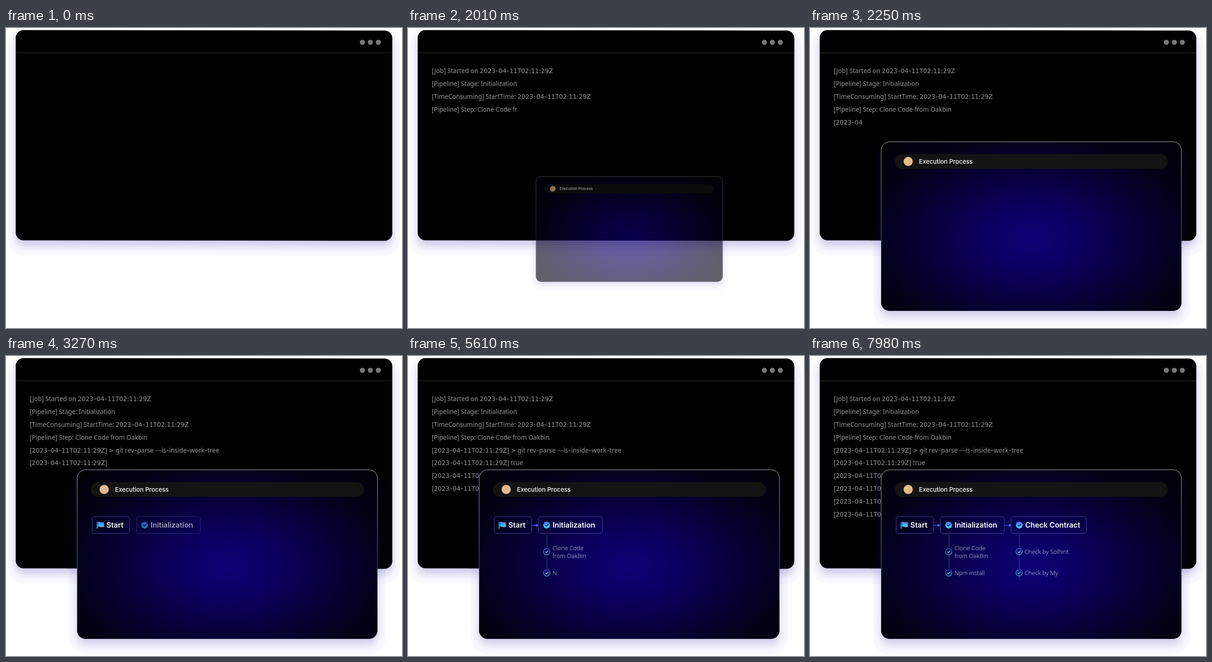
Recreate the animation shown at these times as an HTML page. Size 859 by 652 pixels, loop 8000 ms.

```html
<!DOCTYPE html>
<html lang="en">
<head>
<meta charset="utf-8">
<title>Pipeline run</title>
<style>
  html, body { margin: 0; width: 100%; height: 100%; overflow: hidden; background: #fff; }
  svg { display: block; width: 859px; height: 652px; }
  text { white-space: pre; }
  .log { font: 13.6px "Noto Sans", sans-serif; fill: #979797; }
  .log .wide { font: 13.4px "DejaVu Sans", sans-serif; }
  .title { font: 500 13.2px Inter, sans-serif; fill: #fff; }
  .stage { font: 600 15.8px Inter, sans-serif; fill: #fff; }
  .step { font: 300 13px "Open Sans", sans-serif; fill: #d9d9ee; }
  .box { fill: none; stroke: #454b9c; }
  .dots { stroke: #4a9ae0; stroke-dasharray: 1.5 1.5; }
  .link { stroke: #3f57dc; stroke-width: 1.3; }
  .tick { fill: none; stroke-linecap: round; stroke-linejoin: round; }
</style>
</head>
<body>
<svg id="scene" viewBox="0 0 859 652">
  <defs>
    <filter id="blur" x="-20%" y="-20%" width="140%" height="140%">
      <feGaussianBlur stdDeviation="8"/>
    </filter>
    <radialGradient id="night" gradientUnits="userSpaceOnUse" cx="0" cy="0" r="1"
      gradientTransform="translate(480 457) scale(461 297)">
      <stop offset="0" stop-color="#0c0076"/>
      <stop offset=".25" stop-color="#0a005e"/>
      <stop offset=".5" stop-color="#070038"/>
      <stop offset=".75" stop-color="#030016"/>
      <stop offset="1" stop-color="#000004"/>
    </radialGradient>
    <linearGradient id="rim" x1="0" y1="0" x2="0" y2="1">
      <stop offset="0" stop-color="#fff" stop-opacity=".7"/>
      <stop offset="1" stop-color="#fff" stop-opacity=".15"/>
    </linearGradient>
    <linearGradient id="aqua" x1="0" y1="0" x2="0" y2="1">
      <stop offset="0" stop-color="#4d74ff"/>
      <stop offset="1" stop-color="#35dcea"/>
    </linearGradient>
  </defs>

  <g transform="translate(0 -.03) skewY(.07)">
    <rect x="4" y="4" width="851" height="491" rx="35" fill="#00f" fill-opacity=".028"/>
    <rect x="21" y="17" width="817" height="457" rx="17" fill="#181a82" fill-opacity=".17" filter="url(#blur)"/>
    <rect x="21" y="4.5" width="817" height="457" rx="17"/>
  </g>
  <path d="M21 54H838" stroke="#333"/>
  <g fill="#777">
    <circle cx="773" cy="31" r="5.5"/>
    <circle cx="790.3" cy="31" r="5.5"/>
    <circle cx="807.6" cy="31" r="5.5"/>
  </g>
  <g id="log" class="log"></g>

  <g id="panel">
    <rect x="137" y="246" width="687" height="402" rx="36" fill="#00f" fill-opacity=".028"/>
    <rect x="154" y="259" width="652" height="368" rx="19" fill="#181a82" fill-opacity=".17" filter="url(#blur)"/>
    <rect x="154" y="247" width="652" height="368" rx="19" fill="#000"/>
    <rect x="154" y="247" width="652" height="368" rx="19" fill="url(#night)"/>
    <rect x="154.3" y="247.3" width="651.4" height="367.4" rx="18.5" fill="none" stroke="url(#rim)"/>
    <rect x="184" y="274" width="592" height="32" rx="16" fill="#131313"/>
    <circle cx="213" cy="290" r="10" fill="#e3b98c"/>
    <text class="title" x="236.5" y="294.5">Execution Process</text>
    <g id="flow"></g>
  </g>
</svg>
<script>
const LOOP = 8000, TICK = 30, LOG_MS = 13.76, STEP_MS = 16;
const $ = id => document.getElementById(id);
const clamp = v => Math.max(0, Math.min(1, v));
const span = (t, from, to) => clamp((t - from) / (to - from));
const easeOut = p => 1 - (1 - p) * (1 - p);
const updates = [];

function add(parent, tag, attrs = {}, text = "") {
  const el = document.createElementNS("http://www.w3.org/2000/svg", tag);
  for (const key in attrs) el.setAttribute(key, attrs[key]);
  el.textContent = text;
  parent.append(el);
  return el;
}

// Terminal log
const STAMP = "2023–04–11T02:11:29Z";
const lines = [
  `[Job] Started on ${STAMP}`,
  "[Pipeline] Stage: Initialization",
  `[TimeConsuming] StartTime: ${STAMP}`,
  "[Pipeline] Step: Clone Code from Oakbin",
  `[${STAMP}] > git rev–parse ––is–inside–work–tree`,
  `[${STAMP}] true`,
  `[${STAMP}]`, `[${STAMP}]`, `[${STAMP}]`, `[${STAMP}]`
];
const lateStarts = { 7: 4815, 8: 5850, 9: 7200 };

let typed = 0;
lines.forEach((line, i) => {
  const start = lateStarts[i] ?? typed * LOG_MS;
  typed += line.length;
  const row = add($("log"), "text", { x: 51.5, y: 97.7 + i * 27.95 });
  const parts = line.split(/(\d[\d–:TZ]+|[–>]+)/).map((text, k) =>
    ({ text, el: add(row, "tspan", k % 2 ? { class: "wide" } : {}) }));
  updates.push(t => {
    let left = Math.max(0, Math.floor((t - start) / LOG_MS));
    for (const { text, el } of parts) {
      el.textContent = text.slice(0, left);
      left = Math.max(0, left - text.length);
    }
  });
});

// Flow chart pieces
const flow = $("flow");

function tick(parent, x, y, color, size = 1) {
  add(parent, "path", {
    class: "tick", stroke: color, "stroke-width": 1.5,
    d: `M${x - 3 * size} ${y}l${2.2 * size} ${2.3 * size}l${4 * size} ${-4.4 * size}`
  });
}

function badge(parent, x, y) {
  const points = [];
  for (let a = 0; a < 48; a++) {
    const angle = a * Math.PI / 24, r = 7.3 + 0.45 * Math.cos(8 * angle);
    points.push(`${x + r * Math.cos(angle)},${y + r * Math.sin(angle)}`);
  }
  add(parent, "polygon", { points: points.join(" "), fill: "url(#aqua)" });
  tick(parent, x, y, "#0a0550");
}

function flag(parent, x, y) {
  add(parent, "rect", { x, y, width: 1.8, height: 15.5, rx: .9, fill: "url(#aqua)" });
  add(parent, "path", {
    fill: "url(#aqua)",
    d: `M${x + 2.6} ${y + .8}c4 -2 7 2.4 13 0v10.4c-6 2.4 -9 -2 -13 0z`
  });
}

function stage(x, width, label, icon, start, end) {
  const g = add(flow, "g");
  add(g, "rect", { class: "box", x: x + .5, y: 349.2, width: width - 1, height: 36.4, rx: 5 });
  icon(g);
  add(g, "text", { class: "stage", x: x + 31.2, y: 373 }, label);
  updates.push(t => g.setAttribute("opacity", span(t, start, end)));
}

function link(x, start, end) {
  const line = add(flow, "path", { class: "link" });
  const dot = add(flow, "circle", { cy: 368, fill: "#3f5be8" });
  updates.push(t => {
    const p = span(t, start, end);
    line.setAttribute("d", `M${x} 368h${11 * p}`);
    dot.setAttribute("cx", x + 11 * p);
    dot.setAttribute("r", p ? 2.8 : 0);
  });
}

function dots(x, top, bottom, start, end) {
  const line = add(flow, "path", { class: "dots" });
  updates.push(t =>
    line.setAttribute("d", `M${x} ${top}v${(bottom - top) * span(t, start, end)}`));
}

function pop(x, y, start, end) {
  const g = add(flow, "g");
  add(g, "circle", { r: 6.9, fill: "none", stroke: "url(#aqua)", "stroke-width": 1.2 });
  tick(g, 0, 0, "#45d3ee", .95);
  updates.push(t => {
    const p = span(t, start, end);
    g.setAttribute("opacity", p);
    g.setAttribute("transform", `translate(${x} ${y}) scale(${1.8 - .8 * easeOut(p)})`);
  });
}

function type(x, y, text, start) {
  const rows = text.split("\n").map((row, i) =>
    ({ row, el: add(flow, "text", { class: "step", x, y: y + i * 17.6 }) }));
  updates.push(t => {
    let left = Math.max(0, Math.floor((t - start) / STEP_MS));
    for (const { row, el } of rows) {
      el.textContent = row.slice(0, left);
      left = Math.max(0, left - row.length - 1);
    }
  });
}

stage(186.5, 82, "Start", g => flag(g, 196.8, 360), 2480, 2880);

stage(282.5, 139.5, "Initialization", g => badge(g, 300.8, 367.5), 3000, 3440);
link(268, 3315, 3480);
dots(301.5, 389, 416, 3560, 3780);
pop(300.8, 425.3, 3910, 4170);
type(313.5, 421.5, "Clone Code\nfrom OakBin", 4190);
dots(301.5, 434, 462, 4810, 5040);
pop(300.8, 471.4, 5165, 5430);
type(313.5, 476, "Npm install", 5590);

stage(435.5, 164.5, "Check Contract", g => badge(g, 454, 367.5), 6060, 6500);
link(422, 6375, 6540);
dots(454, 389, 416, 6620, 6840);
pop(453.6, 425, 6970, 7200);
type(465.5, 429.6, "Check by Solhint", 7190);
dots(454, 434, 462, 7290, 7500);
pop(453.6, 471, 7560, 7830);
type(465.5, 475.6, "Check by My", 7796);
dots(454, 479, 507, 7910, 8125);

// Panel grows, rises and fades in together
updates.push(t => {
  const p = easeOut(span(t, 1860, 2250));
  $("panel").setAttribute("opacity", p);
  $("panel").setAttribute("transform",
    `translate(480 ${431 + 16 * (1 - p)}) scale(${p}) translate(-480 -431)`);
});

const origin = performance.now();
function draw() {
  const now = (performance.now() - origin) % LOOP;
  const t = Math.floor(now / TICK) * TICK;
  for (const update of updates) update(t);
  requestAnimationFrame(draw);
}
draw();
</script>
</body>
</html>
```
